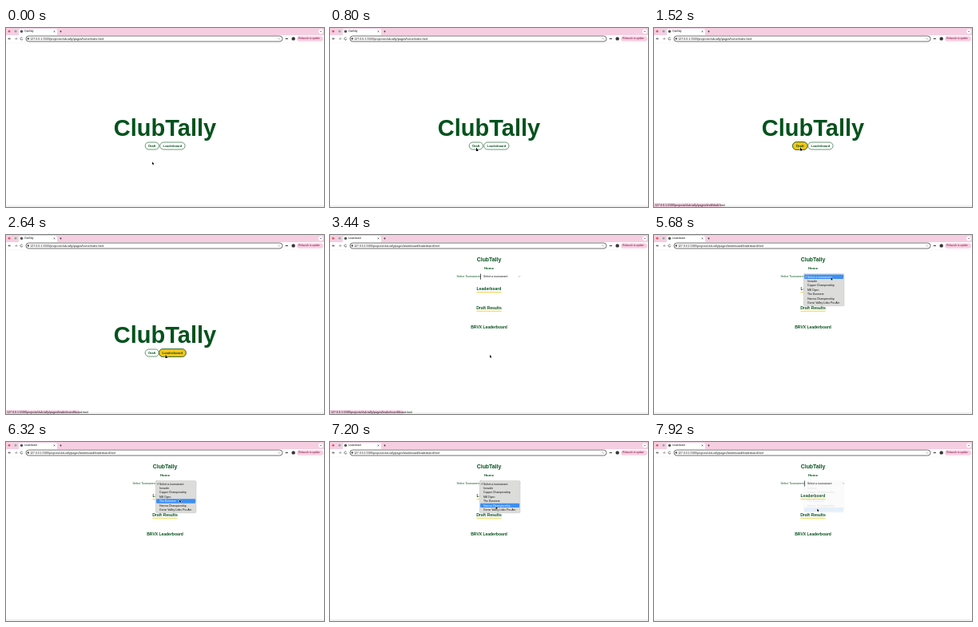
Write an HTML page with a canvas that moves like this. It is 398 px wide and 224 px high and loops after 8000 ms.

```html
<!DOCTYPE html>
<html lang="en">
<head>
<meta charset="utf-8">
<title>ClubTally</title>
<style>
html, body { margin: 0; width: 100%; height: 100%; overflow: hidden; background: #fff; }
canvas { display: block; width: 398px; height: 224px; }
</style>
</head>
<body>
<canvas id="stage"></canvas>
<script>
const W = 398, H = 224, MID = W / 2, LOOP = 8000;
const GREEN = '#04521c', GOLD = '#f5c518', PINK = '#f5cfe1', BLUE = '#3d8ff2';
const INK = '#111', GREY = '#666';
const SANS = '"Liberation Sans", Arial, sans-serif';
const SITE = '127.0.0.1:5500/projects/club-tally/pages/';

const OPTIONS = ['Select a tournament', 'Ironvale', 'Copper Championship', 'Mill Open',
  'The Dunmere', 'Harrow Championship', 'Gorse Valley Links Pro-Am'];
const MENU = { x: 187.2, y: 48.4, w: 50.8, row: 5.42, pad: 1.2 };

const OPEN_PAGE = 3200, OPEN_MENU = 5680, PICK = 7740;
const START = { x: 183, y: 167.5 };
const MOVES = [
  { from: 80, to: 880, x: 183.5, y: 149.5 },
  { from: 1680, to: 2480, x: 200, y: 150 },
  { from: 3440, to: 4240, x: 221, y: 120.5 },
  { from: 4320, to: 5120, x: 221.5, y: 53 },
  { from: 5700, to: 6320, x: 217, y: 72.3 },
  { from: 6400, to: 7600, x: 204.3, y: 83.4 }
];

const canvas = document.getElementById('stage');
const ctx = canvas.getContext('2d');
const dpr = window.devicePixelRatio || 1;
canvas.width = W * dpr;
canvas.height = H * dpr;

const ramp = (t, a, b) => Math.max(0, Math.min(1, (t - a) / (b - a)));
const ease = v => v * v * (3 - 2 * v);

function pointerAt(t) {
  let { x, y } = START;
  for (const m of MOVES) {
    const k = ease(ramp(t, m.from, m.to));
    x += (m.x - x) * k;
    y += (m.y - y) * k;
  }
  return { x, y };
}

function rect(x, y, w, h, color) {
  ctx.fillStyle = color;
  ctx.fillRect(x, y, w, h);
}

function pill(x, y, w, h, r, fill, stroke, line = 0.6) {
  ctx.beginPath();
  ctx.roundRect(x, y, w, h, r);
  if (fill) { ctx.fillStyle = fill; ctx.fill(); }
  if (stroke) { ctx.strokeStyle = stroke; ctx.lineWidth = line; ctx.stroke(); }
}

function disc(x, y, r, color) {
  pill(x - r, y - r, 2 * r, 2 * r, r, color);
}

function stroke(path, color, width = 0.55) {
  ctx.strokeStyle = color;
  ctx.lineWidth = width;
  ctx.stroke(new Path2D(path));
}

function text(s, x, y, size, color, align = 'left', weight = 'normal') {
  ctx.font = `${weight} ${size}px ${SANS}`;
  ctx.textAlign = align;
  ctx.fillStyle = color;
  ctx.fillText(s, x, y);
}

function faded(alpha, paint) {
  if (alpha <= 0) return;
  ctx.save();
  ctx.globalAlpha = alpha;
  paint();
  ctx.restore();
}

function chevron(x, y, color) {
  stroke(`M${x - 1} ${y}l1 1l1 -1`, color);
}

function tabStrip(title) {
  rect(0, 0, W, 9, PINK);
  disc(4, 4.2, 1.4, '#ee4f5e');
  disc(12, 4.2, 1.4, '#7fae93');
  pill(16, 1, 48, 9, [2.5, 2.5, 0, 0], '#fff');
  disc(19.5, 4.3, 1.7, '#555');
  text(title, 23, 5.4, 2.8, INK);
  stroke('M59.7 3.5l1.6 1.6m0 -1.6l-1.6 1.6', INK);
  stroke('M67.3 4.3h2.4m-1.2 -1.2v2.4', INK);
  disc(394, 4.3, 2.8, '#fff');
  chevron(394, 3.9, INK);
}

function toolbar(url, size) {
  rect(0, 9, W, 9.3, '#fff');
  stroke('M6 13.4h-3l1.4 -1.4m-1.4 1.4l1.4 1.4', INK);
  stroke('M11 13.4h3l-1.4 -1.4m1.4 1.4l-1.4 1.4', GREY);
  stroke('M20.6 12.5a1.5 1.5 0 1 0 .3 1.3', INK);
  pill(25, 10, 321, 6.9, 3.45, '#fff', INK);
  disc(27.8, 13.4, 1.3, GREY);
  text(url, 30.2, 14.6, size, INK);
  stroke('M340.6 12.2l2 2.3', GREY);
  stroke('M349.7 13.4h3.2', INK, 0.9);
  disc(359.7, 13.4, 2.2, '#3a3338');
  pill(364, 10.2, 33, 6.5, 3.2, '#f7cfe1');
  text('Relaunch to update', 366.2, 14.4, 3.05, '#7a1146');
}

function browser(inside) {
  tabStrip(inside ? 'Leaderboard' : 'ClubTally');
  toolbar(SITE + (inside ? 'leaderboard/leaderboard.html' : 'home/index.html'), inside ? 3.45 : 3.65);
  rect(0, 18, W, 0.3, '#f3e6ec');
  rect(0, 222.6, W, 0.7, '#d8d5d7');
}

function statusBar(page, w, alpha) {
  faded(alpha, () => {
    pill(-1, 219.2, w + 1, 6, [0, 1.5, 0, 0], PINK);
    text(SITE + page, 1, 222.9, 3.6, INK);
  });
}

function button(x, w, label, hover) {
  const k = 1 + 0.08 * hover;
  ctx.save();
  ctx.translate(x + w / 2, 147.5);
  ctx.scale(k, k);
  pill(-w / 2, -4.5, w, 9, 4.5, '#fff', GREEN);
  faded(hover, () => pill(-w / 2, -4.5, w, 9, 4.5, GOLD, GREEN));
  text(label, 0, 1.4, 3.9, GREEN, 'center', 'bold');
  ctx.restore();
}

function home(t) {
  text('ClubTally', MID, 134.9, 29, GREEN, 'center', 'bold');
  button(174.2, 17.2, 'Draft', ramp(t, 800, 1040) - ramp(t, 1900, 2100));
  button(192.7, 31.3, 'Leaderboard', ramp(t, 2080, 2320));
}

function heading(label, y, size, underlined) {
  text(label, MID, y, size, GREEN, 'center', 'bold');
  if (underlined) rect(MID - 15.6, y + 1.7, 31.2, 0.8, GOLD);
}

function leaderboard() {
  heading('ClubTally', 32.9, 6.9);
  heading('Home', 42.8, 4.4);
  text('Select Tournament:', 158.5, 53.2, 3.5, GREEN);
  rect(188, 48.5, 0.7, 7.2, INK);
  text(OPTIONS[0], 192, 53.3, 3.4, INK);
  chevron(237, 51.4, GREY);
  heading('Leaderboard', 69.4, 5.1, true);
  heading('Draft Results', 93.1, 5.1, true);
  heading('BRVX Leaderboard', 116.7, 5);
}

function menu(t, pointerY) {
  const { x, y, w, row, pad } = MENU;
  const active = Math.floor((pointerY + 0.6 - y - pad) / row);
  faded(t < OPEN_MENU ? 0 : 1 - ramp(t, PICK, PICK + 205), () => {
    pill(x, y, w, row * OPTIONS.length + 2 * pad, 1.5, '#dcdcdb', '#bcbcbc', 0.4);
    OPTIONS.forEach((name, i) => {
      const top = y + pad + i * row;
      const ink = i === active ? '#fff' : INK;
      if (i === active) pill(x + 0.9, top, w - 1.8, row, 1, BLUE);
      if (i === 0) stroke(`M${x + 2} ${top + 2.8}l.7 .8l1.1 -1.8`, ink);
      text(name, x + 4.8, top + 3.9, 3.4, ink);
    });
  });
}

const ARROW = new Path2D('M0 0v3.4l.8 -.6l.5 1.2l.6 -.3l-.5 -1.1l1 -.1z');
const HAND = new Path2D('M-.4 0h.8l.1 1.5l1.5 .4l-.2 2l-2.1 .2l-1.1 -1.8l1 .2z');

function pointer({ x, y }, hand) {
  const shape = hand ? HAND : ARROW;
  ctx.save();
  ctx.translate(x, y);
  ctx.lineJoin = 'round';
  ctx.strokeStyle = '#fff';
  ctx.lineWidth = 0.8;
  ctx.stroke(shape);
  ctx.fillStyle = '#000';
  ctx.fill(shape);
  ctx.restore();
}

function draw(t) {
  const inside = t >= OPEN_PAGE;
  const tip = pointerAt(t);
  ctx.setTransform(dpr, 0, 0, dpr, 0, 0);
  rect(0, 0, W, H, '#fff');
  browser(inside);
  if (inside) leaderboard(); else home(t);
  if (t < 2160) statusBar('draft/draft.html', 84, ramp(t, 960, 1120));
  else statusBar('leaderboard/board.html', 92, 1 - ramp(t, 3440, 3640));
  menu(t, tip.y);
  pointer(tip, t > 800 && t < OPEN_PAGE);
}

const start = performance.now();
function tick() {
  draw((performance.now() - start) % LOOP);
  requestAnimationFrame(tick);
}
draw(0);
requestAnimationFrame(tick);
</script>
</body>
</html>
```
